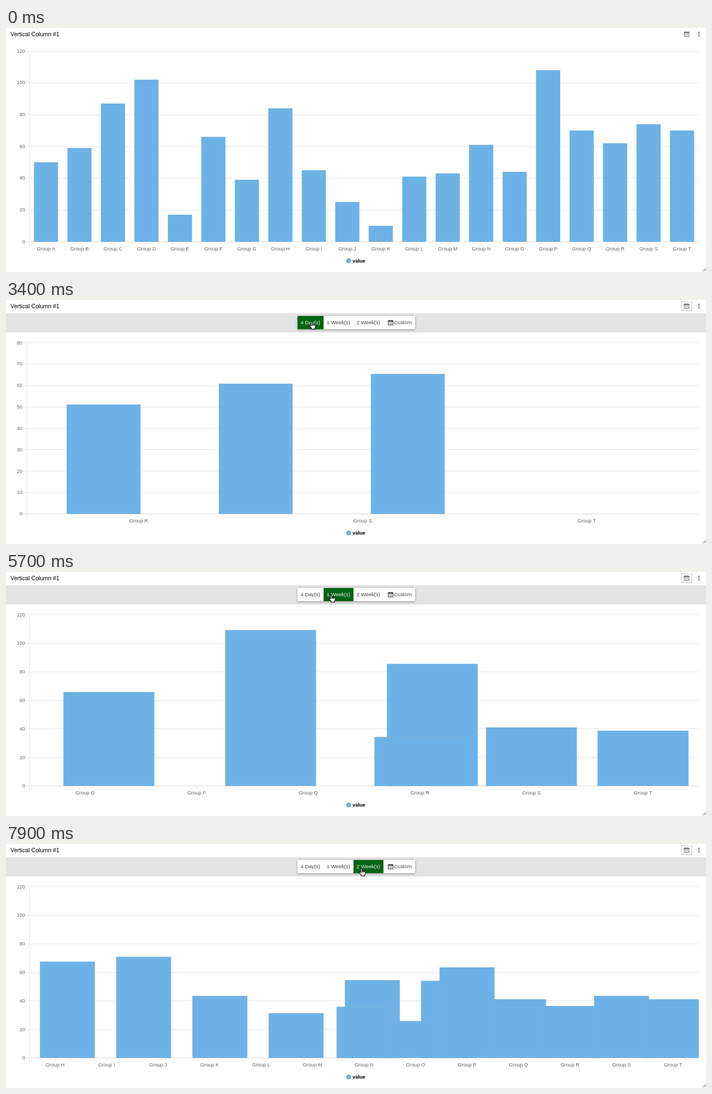
Recreate the animation shown at these times as an HTML page with a canvas. Size 1263 by 443 pixels, loop 8000 ms.

```html
<!DOCTYPE html>
<html lang="en">
<head>
<meta charset="utf-8">
<title>Vertical Column</title>
<style>
html, body { margin: 0; width: 100%; height: 100%; overflow: hidden; background: #fff; }
canvas { display: block; }
</style>
</head>
<body>
<canvas id="stage" width="1263" height="443"></canvas>
<script>
const ctx = document.getElementById('stage').getContext('2d');
const LOOP = 8000, STEP = 100, RIGHT = 1250, BLUE = '#6db2e6';
const FAMILY = '"Liberation Sans", Arial, sans-serif';
const values = [50, 59, 87, 102, 17, 66, 39, 84, 45, 25, 10, 41, 43, 61, 44, 108, 70, 62, 74, 70];

// Each view shows the last `count` groups; bars morph from the view before it.
const views = [
  { shown: 0, start: -2000, count: 20, max: 120, tick: 20, left: 42 },
  { shown: 3200, start: 3184, count: 3, max: 80, tick: 10, left: 37 },
  { shown: 5500, start: 5517, count: 6, max: 120, tick: 20, left: 42 },
  { shown: 7700, start: 7701, count: 13, max: 120, tick: 20, left: 42 }
];
const buttons = [
  { label: '4 Day(s)', x: 526, w: 47, picked: 2800 },
  { label: '1 Week(s)', x: 573, w: 54, picked: 5200 },
  { label: '2 Week(s)', x: 627, w: 54, picked: 7400 },
  { label: 'Custom', x: 681, w: 57, picked: Infinity }
];
// time, x, y
const pointerPath = [
  [200, 684, 0], [400, 850, 30], [600, 1080, 28], [800, 1229, 16], [900, 1229, 16],
  [1000, 1231, 18], [1300, 1231, 18], [1600, 1136, 1], [1700, 1136, 1], [2000, 850, 36],
  [2200, 650, 47], [2400, 553, 46], [4400, 553, 46], [4700, 588.5, 48], [6300, 588.5, 48],
  [6700, 627, 50], [6800, 627, 50], [7100, 643, 51], [8000, 643, 51]
];

const clamp = v => Math.min(1, Math.max(0, v));
const mix = (a, b, p) => a + (b - a) * p;
const easeOutQuart = p => 1 - (1 - p) ** 4;

function rect(x, y, w, h, color) {
  ctx.fillStyle = color;
  ctx.fillRect(x, y, w, h);
}

function text(str, x, y, size, color, align = 'left', weight = '') {
  ctx.font = `${weight} ${size}px ${FAMILY}`;
  ctx.textAlign = align;
  ctx.fillStyle = color;
  ctx.fillText(str, x, y);
}

function dot(x, y, r, color) {
  ctx.beginPath();
  ctx.arc(x, y, r, 0, Math.PI * 2);
  ctx.fillStyle = color;
  ctx.fill();
}

function calendar(x, y, color) {
  ctx.strokeStyle = color;
  ctx.lineWidth = 0.9;
  ctx.strokeRect(x + 0.5, y + 1.5, 9, 8);
  rect(x + 0.5, y + 1.5, 9, 2, color);
  rect(x + 2, y, 1.5, 2.5, color);
  rect(x + 6.5, y, 1.5, 2.5, color);
  ctx.globalAlpha = 0.55;
  for (const d of [2.8, 5, 7.2]) rect(x + d - 0.3, y + 3.5, 0.7, 6, color);
  for (const d of [5.3, 7.3]) rect(x + 0.5, y + d, 9, 0.7, color);
  ctx.globalAlpha = 1;
}

function layout(view, top, bottom) {
  const slot = (RIGHT - view.left) / view.count;
  return values.slice(-view.count).map((v, i) => ({
    cx: view.left + slot * (i + 0.5),
    w: Math.min(slot * 0.72, 187.5),
    h: (bottom - top) * v / view.max
  }));
}

function drawAxes(view, top, bottom) {
  const { left, max, tick, count } = view;
  for (let v = 0; v <= max; v += tick) {
    const y = mix(bottom, top, v / max);
    rect(left - 7, Math.floor(y), RIGHT - left + 7, 1, v ? '#e7e7e7' : '#dedede');
    text(v, left - 7.5, y + 2.8, 9, '#666', 'right');
  }
  rect(left, top, 1, bottom - top + 7, '#e7e7e7');
  const slot = (RIGHT - left) / count;
  for (let i = 0; i < count; i++) {
    const x = left + slot * (i + 0.5);
    rect(Math.floor(x), bottom, 1, 6, '#ededed');
    const letter = String.fromCharCode(65 + values.length - count + i);
    text('Group ' + letter, x, 404, 9, '#666', 'center');
  }
}

function drawBars(index, t, top, bottom) {
  const view = views[index];
  const to = layout(view, top, bottom);
  const from = index ? layout(views[index - 1], top, bottom) : to;
  const p = easeOutQuart(clamp((t - view.start) / 1000));
  ctx.save();
  ctx.beginPath();
  ctx.rect(view.left, top, RIGHT - view.left, bottom - top + 0.5);
  ctx.clip();
  to.forEach((b, i) => {
    const a = from[i] || { cx: b.cx, w: from[0].w, h: 0 };
    const w = mix(a.w, b.w, p), h = mix(a.h, b.h, p), x = mix(a.cx, b.cx, p) - w / 2;
    rect(x, bottom - h, w, h, BLUE);
    ctx.strokeStyle = 'rgba(140,180,208,.5)';
    ctx.lineWidth = 0.75;
    ctx.beginPath();
    ctx.moveTo(x + 0.4, bottom);
    ctx.lineTo(x + 0.4, bottom - h + 0.4);
    ctx.lineTo(x + w - 0.4, bottom - h + 0.4);
    ctx.lineTo(x + w - 0.4, bottom);
    ctx.stroke();
  });
  ctx.restore();
}

function drawPanel(t, open, pointer) {
  if (!open) return;
  ctx.save();
  ctx.beginPath();
  ctx.rect(0, 24, 1263, 35 * open);
  ctx.clip();
  rect(0, 24, 1263, 35, '#e3e3e3');
  ctx.shadowColor = 'rgba(0,0,0,.35)';
  ctx.shadowBlur = 4;
  ctx.shadowOffsetY = 1;
  rect(526, 29, 212, 24, '#fff');
  ctx.shadowColor = 'transparent';
  const selected = buttons.filter(b => t >= b.picked).pop();
  const overRow = pointer && pointer.y > 29 && pointer.y < 54;
  for (const b of buttons) {
    const active = b === selected;
    const hover = overRow && pointer.x >= b.x && pointer.x < b.x + b.w;
    if (active) rect(b.x, 29, b.w, 24, '#006414');
    else if (hover) rect(b.x, 29, b.w, 24, '#f4f5f5');
    const custom = b.label === 'Custom';
    if (custom) calendar(b.x + 8, 36, '#444');
    text(b.label, b.x + (custom ? 19 : 5.6), 44.4, 9.35, active ? '#eef5ef' : '#444');
  }
  ctx.restore();
}

function pointerAt(t) {
  if (t < pointerPath[0][0]) return null;
  const i = pointerPath.findIndex(k => k[0] > t);
  const [t0, x0, y0] = pointerPath[i - 1], [t1, x1, y1] = pointerPath[i];
  const p = (t - t0) / (t1 - t0);
  return { x: mix(x0, x1, p), y: mix(y0, y1, p) };
}

function drawPointer({ x, y }, hand) {
  const shape = hand
    ? 'M-3 1V-5.4Q-3 -6.6 -1.9 -6.6T-.8 -5.4V-2Q.4 -2.8 1.3 -1.8Q2.5 -2.4 3.3 -1.3Q5.6 -1.6 5.6 .4V2.6L4.3 5V6.7H-2V5.2L-5.6 1.2Q-5.8 -.6 -4.3 -.2Z'
    : 'M0 0V13.5L3.2 10.6L5.4 15.6L7.4 14.7L5.2 9.8H9.5Z';
  const path = new Path2D(shape);
  ctx.save();
  ctx.translate(x, y);
  ctx.lineJoin = 'round';
  ctx.lineWidth = 1.1;
  ctx.fillStyle = '#fff';
  ctx.strokeStyle = '#111';
  ctx.shadowColor = 'rgba(0,0,0,.3)';
  ctx.shadowBlur = 1.5;
  ctx.shadowOffsetY = 1;
  ctx.fill(path);
  ctx.shadowColor = 'transparent';
  ctx.stroke(path);
  if (hand) ctx.stroke(new Path2D('M-.8 -2V1M1.3 -1.8V.8M3.3 -1.3V1'));
  ctx.restore();
}

function drawHeader(t) {
  text('Vertical Column #1', 8.3, 15, 10.5, '#000');
  if (t >= 800) {
    ctx.strokeStyle = '#c9c9c9';
    ctx.lineWidth = 1;
    ctx.strokeRect(1218.5, 3.5, 19, 16);
  }
  calendar(1223, 6, '#777');
  for (const y of [8, 11.3, 14.6]) dot(1250.3, y, 1.2, '#666');
}

function draw(t) {
  const open = clamp((t - 1250) / 350);
  const top = mix(42, 77.7, open), bottom = mix(388, 388.5, open);
  const index = views.filter(v => t >= v.shown).length - 1;
  const pointer = pointerAt(t);

  rect(0, 0, 1263, 443, '#fff');
  drawAxes(views[index], top, bottom);
  drawBars(index, t, top, bottom);
  dot(618.4, 422.5 + open / 2, 4.5, BLUE);
  text('value', 625.2, 425.6, 9, '#000', 'left', 'bold');
  drawHeader(t);
  drawPanel(t, open, pointer);
  rect(1257, 440, 5, 1, '#777');
  rect(1261, 436, 1, 5, '#777');
  if (pointer) drawPointer(pointer, (t >= 800 && t < 1400) || t >= 2200);
}

function frame() {
  const t = performance.now() % LOOP;
  draw(Math.floor(t / STEP) * STEP);
  requestAnimationFrame(frame);
}
frame();
</script>
</body>
</html>
```
